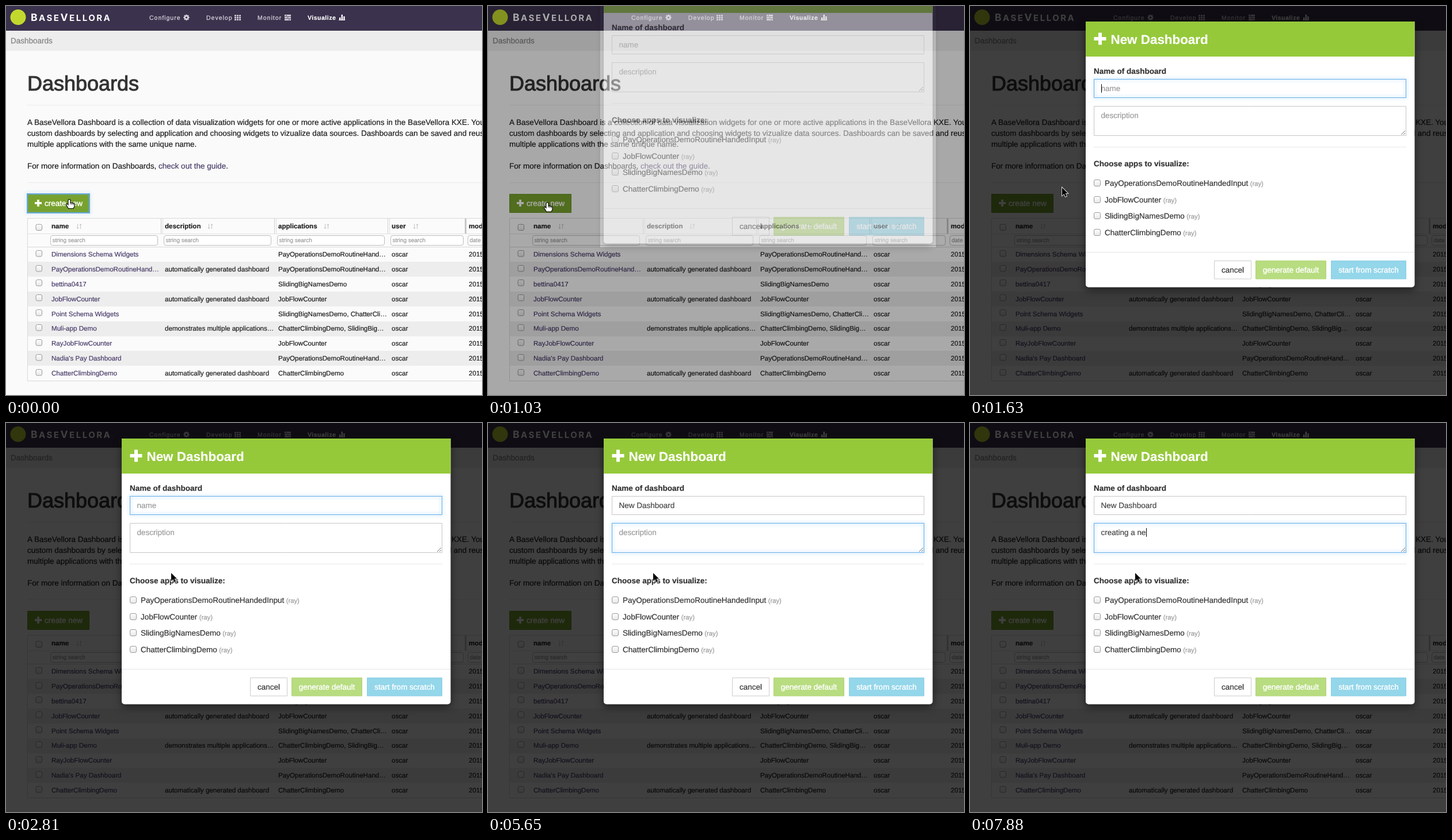
Write an HTML page with a canvas that moves like this. It is 827 px wide and 677 px high and loops after 8 s.

```html
<!DOCTYPE html>
<html lang="en">
<head>
<meta charset="utf-8">
<title>New dashboard dialog</title>
<style>
  html, body { margin: 0; width: 827px; height: 677px; overflow: hidden; background: #fafafa; }
  canvas { display: block; }
</style>
</head>
<body>
<canvas id="stage" width="827" height="677"></canvas>
<script>
const W = 827, H = 677, LOOP = 8000;
const BODY = 13.5, CELL = 11.6;
const SANS = '"Liberation Sans", Arial, sans-serif';
const LINK = '#483a68';

const stage = document.getElementById('stage').getContext('2d');
const layer = document.createElement('canvas');
layer.width = W;
layer.height = H;
const modalLayer = layer.getContext('2d');
let g = stage;

// Each key is [start time, value]; the value holds until the next key.
const hold = (keys, t) => keys.reduce((value, key) => t >= key[0] ? key[1] : value, keys[0][1]);
const within = (spans, t) => spans.some(([from, to]) => t >= from && t < to);

function text(s, x, y, size, color, weight = 400, heavier = .2, spacing = 0) {
  g.font = `${weight} ${size}px ${SANS}`;
  g.letterSpacing = spacing + 'px';
  g.fillStyle = color;
  g.fillText(s, x, y);
  if (heavier) {
    g.strokeStyle = color;
    g.lineWidth = heavier;
    g.strokeText(s, x, y);
  }
  return x + g.measureText(s).width;
}

function rect(x, y, w, h, color) {
  g.fillStyle = color;
  g.fillRect(x, y, w, h);
}

function box(x, y, w, h, radius, fill, border) {
  g.beginPath();
  g.roundRect(x + .5, y + .5, w - 1, h - 1, radius);
  g.fillStyle = fill;
  g.fill();
  g.strokeStyle = border;
  g.lineWidth = 1;
  g.stroke();
}

function plus(x, y, size, thick) {
  const inset = (size - thick) / 2;
  rect(x, y + inset, size, thick, '#fff');
  rect(x + inset, y, thick, size, '#fff');
}

function checkbox(x, y, size) {
  const shade = g.createLinearGradient(0, y, 0, y + size);
  shade.addColorStop(0, '#fff');
  shade.addColorStop(1, '#e6e6e6');
  box(x, y, size, size, 2.5, shade, '#9a9a9a');
}

function glow(x, y, w, h, amount, color = '#66afe9') {
  if (!amount) return;
  g.save();
  g.globalAlpha *= amount;
  g.strokeStyle = color;
  g.lineWidth = 1;
  g.shadowColor = color;
  g.shadowBlur = 6;
  g.strokeRect(x + .5, y + .5, w - 1, h - 1);
  g.restore();
}

function wordmark() {
  g.fillStyle = '#fff';
  g.letterSpacing = '2.5px';
  let x = 43;
  for (const [s, size] of [['B', 17.5], ['ASE', 15], ['V', 17.5], ['ELLORA', 15]]) {
    g.font = `700 ${size}px Inter, sans-serif`;
    g.fillText(s, x, 25.5);
    x += g.measureText(s).width;
  }
}

function gear(x, y, color) {
  g.strokeStyle = color;
  g.lineWidth = 2.6;
  g.beginPath();
  g.arc(x, y, 2.9, 0, 7);
  g.stroke();
  g.lineWidth = 2;
  for (let i = 0; i < 8; i++) {
    const a = i * Math.PI / 4, c = Math.cos(a), s = Math.sin(a);
    g.beginPath();
    g.moveTo(x + c * 3.5, y + s * 3.5);
    g.lineTo(x + c * 5.2, y + s * 5.2);
    g.stroke();
  }
}

function navbar() {
  const pale = '#d2ced8';
  rect(0, 0, W, 43, '#3b324d');
  g.fillStyle = '#c3d82e';
  g.beginPath();
  g.arc(21, 19.5, 13.5, 0, 7);
  g.fill();
  wordmark();
  text('Configure', 249, 24, 10.5, pale, 400, .3, 1);
  text('Develop', 348, 24, 10.5, pale, 400, .3, 1);
  text('Monitor', 437, 24, 10.5, pale, 400, .3, 1);
  text('Visualize', 524, 24, 10.5, '#fff', 700, .2, .5);
  gear(313.5, 20, pale);
  for (let i = 0; i < 3; i++) {
    for (let j = 0; j < 3; j++) rect(397 + i * 4, 15.5 + j * 3.5, 3, 2.6, pale);
    rect(484, 15 + i * 3.7, 11, 2.8, pale);
    rect(486 + i * 2.5, 16 + i * 3.7, 2, .9, '#3b324d');
    rect(579 + i * 3.6, [20, 15, 18][i], 2.4, [4, 9, 6][i], '#fff');
  }
  rect(578, 24, 11, 1, '#fff');
}

const LONG = 'PayOperationsDemoRoutineHand…';
const AUTO = 'automatically generated dashboard';
const ROWS = [
  ['Dimensions Schema Widgets', '', LONG],
  [LONG, AUTO, LONG],
  ['bettina0417', '', 'SlidingBigNamesDemo'],
  ['JobFlowCounter', AUTO, 'JobFlowCounter'],
  ['Point Schema Widgets', '', 'SlidingBigNamesDemo, ChatterCli…'],
  ['Muli-app Demo', 'demonstrates multiple applications…', 'ChatterClimbingDemo, SlidingBig…'],
  ['RayJobFlowCounter', '', 'JobFlowCounter'],
  ["Nadia's Pay Dashboard", '', LONG],
  ['ChatterClimbingDemo', AUTO, 'ChatterClimbingDemo'],
];
// label, text x, sort icon x, filter x, filter width, filter hint
const COLUMNS = [
  ['name', 79, 122, 77, 187, 'string search'],
  ['description', 276, 350, 274, 187, 'string search'],
  ['applications', 473, 552, 471, 187, 'string search'],
  ['user', 670, 707, 668, 127, 'string search'],
  ['modified', 804, 850, 802, 120, 'date search'],
];

function sortIcon(x) {
  g.strokeStyle = '#c4c4c4';
  g.lineWidth = 1;
  g.stroke(new Path2D(`M${x + 2.5} 379v8.5m-2-2l2 2l2-2M${x + 7.5} 388v-8.5m-2 2l2-2l2 2`));
}

function table() {
  const top = 419.5, pitch = 25.85;
  rect(37, 369, W, 284, '#fbfbfb');
  ROWS.forEach((row, i) => {
    const y = top + i * pitch, base = y + 16.6;
    if (i % 2) rect(38, Math.round(y), W, 26, '#ededed');
    checkbox(51.5, Math.round(y + 5.2), 11.5);
    [...row, 'oscar', '2015-06-02'].forEach((s, c) =>
      text(s, COLUMNS[c][1], base, CELL, c ? '#1c1c1c' : LINK));
  });
  const line = '#d8d8d8';
  rect(37, 369, W, 1, line);
  rect(37, 396, W, 1, '#e2e2e2');
  rect(37, 419, W, 1, line);
  rect(37, 652, W, 1, line);
  rect(37, 369, 1, 284, line);
  for (const x of [269, 466, 663]) {
    rect(x, 370, 1, 26, '#cfcfcf');
    rect(x + 3, 370, 1, 26, '#dedede');
  }
  rect(797, 370, 3, 26, '#c8c8c8');
  checkbox(51.5, 379.5, 11.5);
  for (const [label, x, sortX, filterX, width, hint] of COLUMNS) {
    text(label, x, 387, CELL, '#222', 700);
    sortIcon(sortX);
    box(filterX, 399, width, 18, 3.5, '#fff', '#bdbdbd');
    text(hint, filterX + 3.5, 411, 10, '#999');
  }
}

function page(t) {
  rect(0, 0, W, H, '#fafafa');
  navbar();
  rect(0, 43, W, 35, '#ededed');
  text('Dashboards', 8, 65, BODY, '#888', 400, .3);
  text('Dashboards', 37, 147, 36, '#333', 400, 1);
  rect(37, 172, W, 1, '#e9e9e9');
  rect(37, 307, W, 1, '#e9e9e9');
  [
    'A BaseVellora Dashboard is a collection of data visualization widgets for one or more active applications in the BaseVellora KXE. You can',
    'custom dashboards by selecting and application and choosing widgets to vizualize data sources. Dashboards can be saved and reused',
    'multiple applications with the same unique name.',
  ].forEach((s, i) => text(s, 37, 206.5 + i * 19.2, BODY, '#1c1c1c'));
  let x = text('For more information on Dashboards, ', 37, 283, BODY, '#1c1c1c');
  x = text('check out the guide', x, 283, BODY, LINK);
  text('.', x, 283, BODY, '#1c1c1c');

  const pressed = within([[590, 730]], t);
  box(37, 327, 108, 33, 0, pressed ? '#6b932a' : '#78a22d', '#6c9428');
  if (t < 1030) {
    g.strokeStyle = '#6aaedb';
    g.lineWidth = 2;
    g.strokeRect(37, 327, 108, 33);
    glow(36, 326, 110, 35, .8, '#5fa8e0');
  }
  plus(50, 337, 12, 3.6);
  text('create new', 67, 348, BODY, '#fff', 400, .4);
  table();
}

const NAME = [[0, ''], [2960, 'N'], [3100, 'Ne'], [3250, 'New '], [3700, 'New D'], [3850, 'New Das'],
  [4000, 'New Dash'], [4150, 'New Dashb'], [4300, 'New Dashbo'], [4450, 'New Dashboar'], [4600, 'New Dashboard']];
const DESCRIPTION = [[0, ''], [6400, 'c'], [6700, 'cr'], [6850, 'cre'], [7000, 'creat'], [7150, 'creati'],
  [7290, 'creating '], [7590, 'creating a'], [7740, 'creating a '], [7880, 'creating a ne']];
const NAME_CARET = [[1180, 1920], [2370, 2810], [2960, 5050]];
const DESCRIPTION_CARET = [[5050, 5650], [6100, LOOP]];
const NAME_FOCUS = [[0, 0], [1180, 1], [5050, .5], [5200, 0]];
const DESCRIPTION_FOCUS = [[0, 0], [5050, .5], [5200, 1]];

function field(y, h, value, hint, focus, caret) {
  box(215, y, 543, h, 0, '#fff', '#c6c6c6');
  glow(215, y, 543, h, focus);
  const end = text(value, 227.5, y + 21, BODY, '#444');
  if (!value) text(hint, 227.5, y + 21, BODY, '#999');
  if (caret) rect(Math.round(end), y + 9, 1, 15, '#000');
}

function button(x, w, label, fill, border, color, heavier) {
  box(x, 443, w, 32.5, 0, fill, border);
  g.textAlign = 'center';
  text(label, x + w / 2, 463.7, BODY, color, 400, heavier);
  g.textAlign = 'left';
}

function modal(t) {
  g.clearRect(0, 0, W, H);
  g.save();
  g.shadowColor = 'rgba(0,0,0,.5)';
  g.shadowBlur = 14;
  g.shadowOffsetY = 5;
  g.beginPath();
  g.roundRect(201, 27, 571.5, 462.5, [0, 0, 5, 5]);
  g.fillStyle = '#fff';
  g.fill();
  g.restore();

  rect(201, 27, 571.5, 61, '#95c93a');
  plus(215.5, 46.5, 21, 6);
  text('New Dashboard', 244.5, 66, 22.4, '#fff', 700);

  text('Name of dashboard', 215, 117.7, BODY, '#333', 700);
  field(127, 33, hold(NAME, t), 'name', hold(NAME_FOCUS, t), within(NAME_CARET, t));
  field(174, 52, hold(DESCRIPTION, t), 'description', hold(DESCRIPTION_FOCUS, t), within(DESCRIPTION_CARET, t));
  g.strokeStyle = '#777';
  g.lineWidth = 1;
  g.stroke(new Path2D('M749 224l7-7M753 224l3-3'));

  rect(215, 245, 543, 1, '#e8e8e8');
  text('Choose apps to visualize:', 215, 279, BODY, '#333', 700);
  ['PayOperationsDemoRoutineHandedInput', 'JobFlowCounter', 'SlidingBigNamesDemo', 'ChatterClimbingDemo']
    .forEach((app, i) => {
      const y = 313 + i * 28.7;
      checkbox(215, Math.round(y - 11), 12);
      const end = text(app, 234, y, BODY, '#333');
      text('(ray)', end + 3.5, y, 11.3, '#999');
    });

  rect(201, 428, 571, 1, '#e5e5e5');
  button(424, 65, 'cancel', '#fff', '#ccc', '#333', .2);
  button(496, 123, 'generate default', '#b8dc80', '#b0d676', '#fff', .4);
  button(627, 131, 'start from scratch', '#94d6ea', '#8acfe4', '#fff', .4);
}

const HAND = new Path2D('M-2 1Q0-1 2 1V6Q3.5 5 4.5 6.5Q6 5.6 7 7Q9 6.5 9 8.5V12L7 16H-1.5L-5.5 9.5Q-5.5 7.5-3.5 8L-2 9.5Z');
const FINGERS = new Path2D('M2 6V9M4.5 6.5V9.5M7 7V10');
const ARROW = new Path2D('M0 0V14L3.4 11L5.6 16L8 15L5.8 10H10Z');
const POINTER = [[0, [110, 336.5]], [140, [109, 337]], [290, [107, 339]], [440, [105, 340]], [590, [104, 341]],
  [730, [103, 342]], [1630, [160, 316]], [1780, [258, 273]], [1920, [287, 261]]];

function pointer(t) {
  g.save();
  g.translate(...hold(POINTER, t));
  if (t < 1630) {
    g.fillStyle = '#fff';
    g.strokeStyle = '#000';
    g.lineWidth = 1.1;
    g.fill(HAND);
    g.stroke(HAND);
    g.lineWidth = .8;
    g.stroke(FINGERS);
  } else {
    g.strokeStyle = '#fff';
    g.lineWidth = 1.6;
    g.stroke(ARROW);
    g.fillStyle = '#000';
    g.fill(ARROW);
  }
  g.restore();
}

// The backdrop darkens a little later behind the dialog than around it.
const DIM_AROUND = [[0, 0], [1030, .33], [1180, .73], [1330, .75]];
const DIM_BEHIND = [[0, 0], [1030, .17], [1180, .73], [1330, .75]];
const MODAL_ALPHA = [[0, 0], [1030, .48], [1180, 1]];
const MODAL_SHIFT = [[0, -76], [1180, -13], [1330, 0]];

function backdrop(t) {
  const panel = [195, 0, 583, 420];
  g.beginPath();
  g.rect(0, 0, W, H);
  g.rect(...panel);
  g.fillStyle = `rgba(0,0,0,${hold(DIM_AROUND, t)})`;
  g.fill('evenodd');
  rect(...panel, `rgba(0,0,0,${hold(DIM_BEHIND, t)})`);
}

function draw(t) {
  g = stage;
  page(t);
  if (t >= 1030) {
    backdrop(t);
    g = modalLayer;
    modal(t);
    g = stage;
    g.globalAlpha = hold(MODAL_ALPHA, t);
    g.drawImage(layer, 0, hold(MODAL_SHIFT, t));
    g.globalAlpha = 1;
  }
  pointer(t);
}

stage.textRendering = modalLayer.textRendering = 'geometricPrecision';
const start = performance.now();
function tick() {
  draw((performance.now() - start) % LOOP);
  requestAnimationFrame(tick);
}
tick();
</script>
</body>
</html>
```
